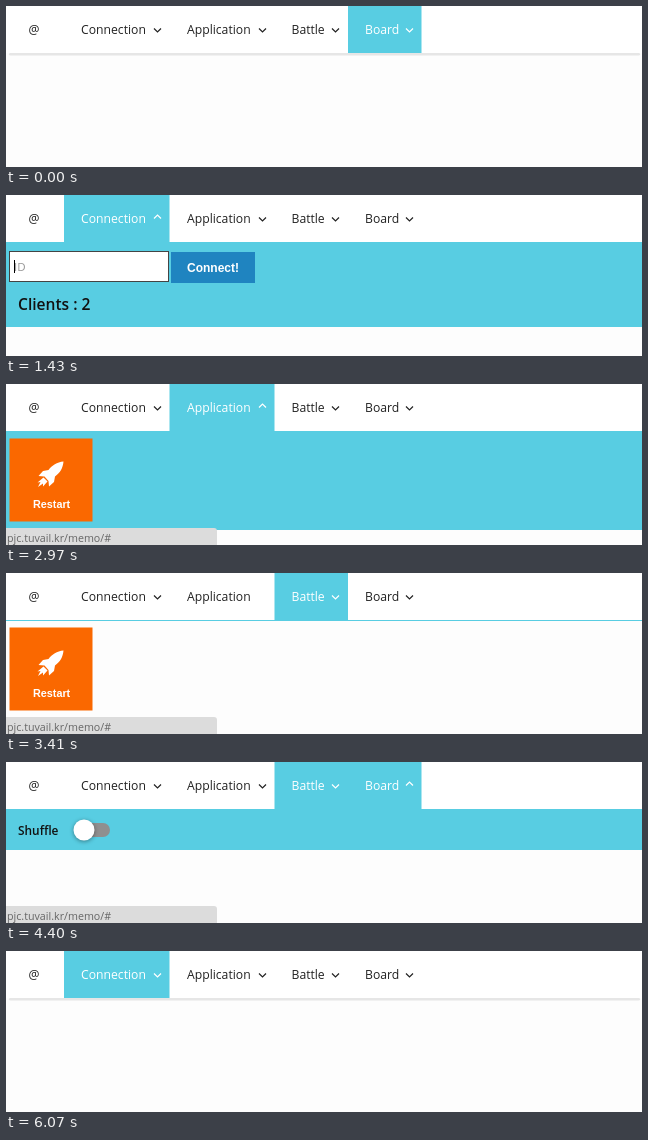
Write an HTML page with a canvas that moves like this. It is 636 px wide and 161 px high and loops after 6140 ms.

```html
<!DOCTYPE html>
<html lang="en">
<head>
<meta charset="utf-8">
<title>Dropdown menu</title>
<style>
html, body { margin: 0; width: 636px; height: 161px; overflow: hidden; background: #fdfdfd; }
canvas { display: block; }
</style>
</head>
<body>
<canvas id="stage" width="636" height="161"></canvas>
<script>
const ctx = document.getElementById('stage').getContext('2d');
const LOOP = 6140, SLIDE = 400, NAV = 47;
const CYAN = '#58cde2', INK = '#222';
const SANS = '"Open Sans", "Noto Sans", sans-serif';
const ARIAL = '"Liberation Sans", Arial, sans-serif';

// label, left edge, right edge, text x, arrow x
const items = [
  ['@', 0, 58, 22.5],
  ['Connection', 58, 163.5, 75, 151.5],
  ['Application', 163.5, 268.5, 181, 256.5],
  ['Battle', 268.5, 342, 285.5, 329.5],
  ['Board', 342, 415.5, 359, 403.5]
];
const panels = {
  1: { height: 85, paint: connection },
  2: { height: 99, paint: application },
  3: { height: 0, paint() {} },
  4: { height: 41, paint: board }
};

// [time, item]; -1 means none
const clicks = [[-1000, -1], [490, 1], [2175, 2], [3405, 3], [3440, 4], [4560, 1], [5660, -1]];
const hovers = [[0, 4], [290, 3], [340, 2], [390, 1], [1110, -1], [2060, 1], [2110, 2],
  [3000, 3], [3440, 4], [4210, 3], [4450, 2], [4510, 1], [4930, 0], [5630, 1]];

const clamp = v => Math.min(1, Math.max(0, v));
const swing = p => 0.5 - Math.cos(Math.PI * p) / 2;
const lastIndex = (list, t) => list.filter(e => e[0] <= t).length - 1;

function rect(x, y, w, h, color) {
  ctx.fillStyle = color;
  ctx.fillRect(x, y, w, h);
}

function text(s, x, y, font, color) {
  ctx.font = font;
  ctx.fillStyle = color;
  ctx.fillText(s, x, y);
}

function shape(path, color) {
  ctx.fillStyle = color;
  ctx.fill(new Path2D(path));
}

function pill(x, y, w, h, r, color) {
  ctx.fillStyle = color;
  ctx.beginPath();
  ctx.roundRect(x, y, w, h, r);
  ctx.fill();
}

function connection(o) {
  rect(3, 56, 160, 31, o.focus ? '#444' : '#aaa');
  rect(4, 57, 158, 29, '#fff');
  rect(165, 57, 84, 31, '#1f84c0');
  if (o.leaving) return;
  text('ID', 8, 75.5, '11.5px ' + SANS, '#999');
  if (o.focus) rect(8, 65, 1, 13, '#000');
  text('Connect!', 181, 77, 'bold 12px ' + ARIAL, '#fff');
  text('Clients : 2', 12, 115, '600 15.6px ' + SANS, '#111');
}

function application(o) {
  if (o.moving) rect(3, 54, 84, 84, '#d5d0c8');
  rect(3.5, 54.5, 83, 83, '#fa6800');
  shape('M57.5 77.5C51 78 46 81.5 42.5 86L37 87L32.5 92L38.5 92.5L42.5 97L43 102.5L48 98L49 92.5C54 89 57 84 57.5 77.5Z', '#fff');
  shape('M37.5 93.5L31.5 98.5L34.5 98L32 103L37 99.5L37 102.5L41.5 97.5Z', '#fff');
  text('Restart', 27, 124, 'bold 10.8px ' + ARIAL, '#fff');
}

function board() {
  text('Shuffle', 12, 72.5, '600 11.9px ' + SANS, '#111');
  pill(72, 61, 32, 14, 7, '#8f8f8f');
  ctx.save();
  ctx.shadowColor = 'rgba(0,0,0,.4)';
  ctx.shadowBlur = 4;
  ctx.shadowOffsetY = 1;
  pill(67.5, 57.5, 21, 21, 10.5, '#fff');
  ctx.restore();
}

function content(id, dy, options) {
  ctx.save();
  ctx.translate(0, dy);
  panels[id].paint(options);
  ctx.restore();
}

function panel(id, amount, options) {
  const h = Math.max(1, Math.round(panels[id].height * amount));
  ctx.save();
  ctx.beginPath();
  ctx.rect(0, NAV, 636, h);
  ctx.clip();
  rect(0, NAV, 636, h, CYAN);
  content(id, -5 * (1 - amount), options);
  ctx.restore();
}

function arrow(x, turn, color) {
  ctx.save();
  ctx.translate(x, 23);
  ctx.rotate(Math.PI * turn);
  ctx.strokeStyle = color;
  ctx.lineWidth = 1.2;
  ctx.beginPath();
  ctx.moveTo(-3.5, -0.5);
  ctx.lineTo(0, 3);
  ctx.lineTo(3.5, -0.5);
  ctx.stroke();
  ctx.restore();
}

function nav(open, prev, hover, p) {
  rect(0, 0, 636, NAV, '#fff');
  items.forEach(([label, left, right, x, arrowX], i) => {
    const lit = i === open || i === hover;
    if (lit) rect(left, 0, right - left, NAV, CYAN);
    text(label, x, 27.5, '12.2px ' + SANS, lit ? '#fff' : INK);
    if (!arrowX) return;
    const turn = i === open ? p * p : i === prev ? 1 - p * p : 0;
    const gray = i === prev ? 255 - 221 * p * p : 34;
    arrow(arrowX, turn, lit ? '#fff' : `rgb(${gray},${gray},${gray})`);
  });
}

function status(t) {
  const alpha = t < 1500
    ? clamp((t - 290) / 100) * clamp((1430 - t) / 280)
    : clamp((t - 2060) / 100) * clamp((6000 - t) / 280);
  ctx.globalAlpha = alpha;
  pill(-4, 144, 215, 21, 3, '#dcdcdc');
  text('pjc.tuvail.kr/memo/#', 1, 157.5, '10.7px ' + SANS, '#666');
  ctx.globalAlpha = 1;
}

function draw(t) {
  const k = lastIndex(clicks, t);
  const [start, open] = clicks[k];
  const prev = k ? clicks[k - 1][1] : -1;
  const hover = hovers[lastIndex(hovers, t)][1];
  const p = clamp((t - start) / SLIDE), e = swing(p);
  const focus = t >= 1400 && t < 2175;

  rect(0, 0, 636, 161, '#fdfdfd');
  // the outgoing content lingers below the new panel
  if (open > 0 && prev > 0 && p < 0.5) content(prev, -8 * e, { leaving: true });
  nav(open, prev, hover, p);
  if (open > 0) panel(open, e, { focus, moving: p < 1 });
  else if (prev > 0 && p < 1) panel(prev, 1 - e, {});
  else pill(3, 47, 631, 2.5, 1.2, '#e6e6e6');
  status(t);
}

function tick() {
  draw(performance.now() % LOOP);
  requestAnimationFrame(tick);
}
tick();
</script>
</body>
</html>
```
